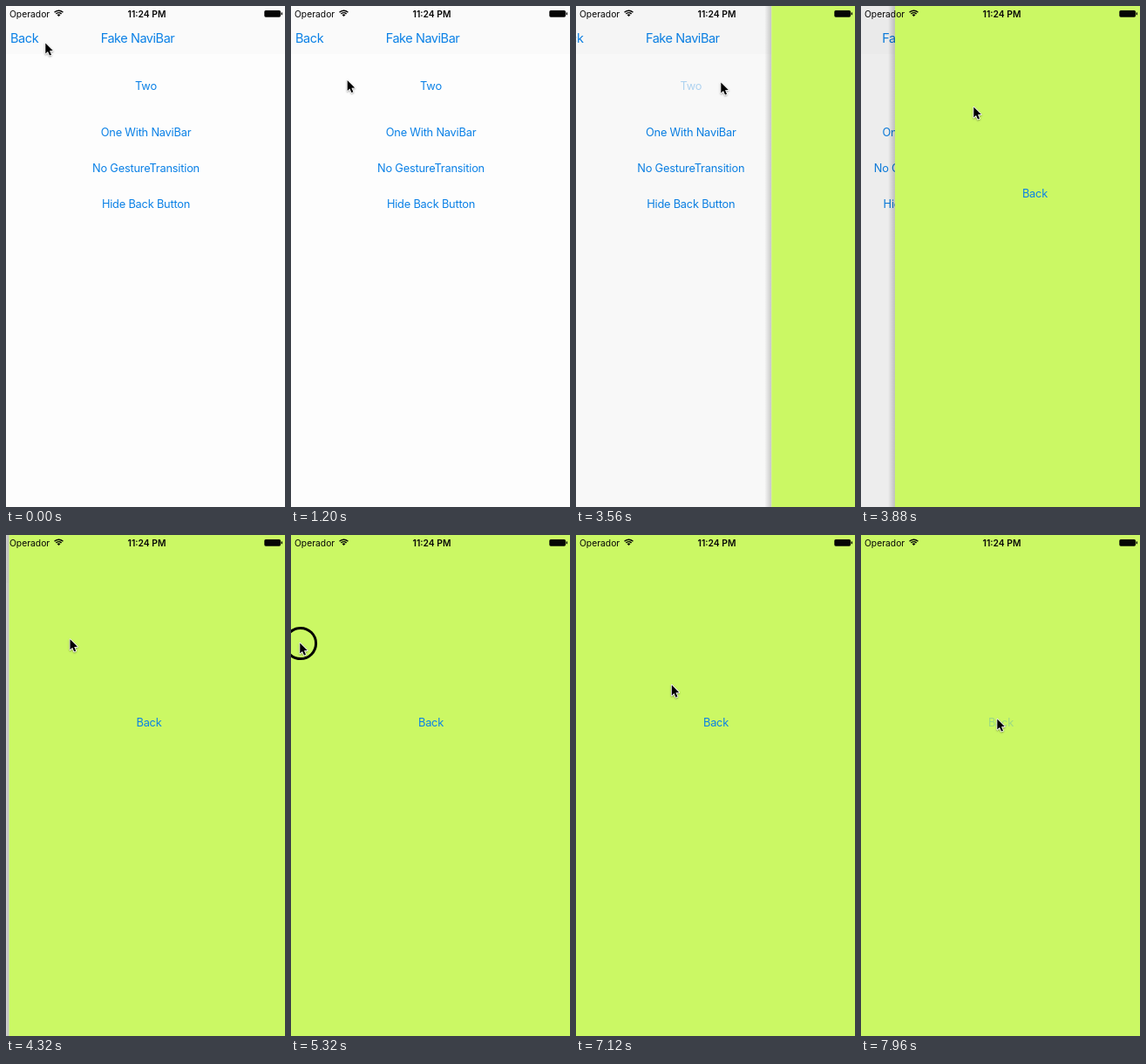
An HTML page with a canvas for the animation above (8000 ms loop, 320x573 px).

```html
<!DOCTYPE html>
<html lang="en">
<head>
<meta charset="utf-8">
<title>Navigation transition</title>
<style>
  html, body { margin: 0; width: 100%; height: 100%; overflow: hidden; background: #fdfdfd; }
  canvas { display: block; width: 320px; height: 573px; }
</style>
</head>
<body>
<canvas id="stage"></canvas>
<script>
const W = 320, H = 573, LOOP = 8000;
const BLUE = '#0a80e6', LIME = '#cbf864', INK = '#050505';
const FONT = 'Inter, Roboto, sans-serif';

const canvas = document.getElementById('stage');
const ctx = canvas.getContext('2d');
const dpr = window.devicePixelRatio || 1;
canvas.width = W * dpr;
canvas.height = H * dpr;

// Times in ms
const TAP_TWO = [3370, 3496];
const SWIPE = [5260, 6384];
const TAP_BACK = [7760, 7930];
const CANCEL_END = 6600;

// Pointer tip: [time, x, y]
const pointerPath = [
  [0, 45, 42], [500, 45, 42], [2000, 88, 136], [2560, 88, 136],
  [3200, 166, 87], [3620, 166, 87], [3880, 129, 115], [4800, 10, 123],
  [5400, 10, 123], [5880, 40, 123], [6300, 48, 122], [6600, 48, 122],
  [7560, 157, 209], [7640, 156, 210], [LOOP, 156, 210]
];

const clamp = v => Math.max(0, Math.min(1, v));
const mix = (a, b, u) => a + (b - a) * u;
const smooth = u => u * u * (3 - 2 * u);
const within = (t, [from, to]) => t >= from && t < to;

function pointerAt(t) {
  const i = pointerPath.findIndex(p => p[0] > t);
  const [t0, x0, y0] = pointerPath[i - 1];
  const [t1, x1, y1] = pointerPath[i];
  const u = smooth((t - t0) / (t1 - t0));
  return [mix(x0, x1, u), mix(y0, y1, u)];
}

// Left edge of the lime page
function edgeAt(t) {
  if (t < TAP_TWO[1]) return W;
  if (t < SWIPE[0]) {
    const x = W * Math.exp(-5.47 * (t - TAP_TWO[1]) / 1000);
    return x < 0.5 ? 0 : x;
  }
  if (t < SWIPE[1]) return Math.max(0, pointerAt(t)[0] - 10);
  return 38 * (1 - clamp((t - SWIPE[1]) / (CANCEL_END - SWIPE[1])));
}

// Button label opacity: drops on touch, fades back after release
function labelAlpha(t, [down, up]) {
  if (t < down) return 1;
  return t < up ? 0.2 : mix(0.2, 1, clamp((t - up) / 470));
}

function text(str, x, y, size, { align = 'center', weight = 400, color = BLUE, spacing = 0, alpha = 1 } = {}) {
  ctx.globalAlpha = alpha;
  ctx.font = `${weight} ${size}px ${FONT}`;
  ctx.letterSpacing = spacing + 'px';
  ctx.textAlign = align;
  ctx.fillStyle = color;
  ctx.fillText(str, x, y);
  ctx.globalAlpha = 1;
}

const button = (str, y, alpha = 1) => text(str, 160.5, y, 12.8, { spacing: -0.2, alpha });

function drawMenu(t, edge) {
  const shown = 1 - edge / W;
  ctx.fillStyle = '#fdfdfd';
  ctx.fillRect(0, 0, W, H);
  ctx.save();
  ctx.translate(-0.3 * W * shown, 0);
  ctx.fillStyle = '#fafafa';
  ctx.fillRect(0, 0, W, 55);
  text('Back', 5, 41.5, 14.5, { align: 'left', spacing: -0.4 });
  text('Fake NaviBar', 151, 41.5, 14.5, { spacing: -0.45 });
  button('Two', 95.5, labelAlpha(t, TAP_TWO));
  button('One With NaviBar', 149);
  button('No GestureTransition', 189.5);
  button('Hide Back Button', 231);
  ctx.restore();
  ctx.fillStyle = `rgba(0,0,0,${0.07 * shown})`;
  ctx.fillRect(0, 0, W, H);
}

function drawLime(t, edge) {
  if (edge > 0) {
    const shade = ctx.createLinearGradient(edge - 8, 0, edge, 0);
    shade.addColorStop(0, 'rgba(0,0,0,0)');
    shade.addColorStop(1, 'rgba(0,0,0,0.2)');
    ctx.fillStyle = shade;
    ctx.fillRect(edge - 8, 0, 8, H);
  }
  ctx.save();
  ctx.translate(edge, 0);
  ctx.fillStyle = LIME;
  ctx.fillRect(0, 0, W, H);
  button('Back', 218.7, labelAlpha(t, TAP_BACK));
  ctx.restore();
}

function drawStatus() {
  text('Operador', 4, 12.7, 10.3, { align: 'left', color: INK });
  text('11:24 PM', 161.5, 12.7, 10.3, { weight: 600, color: INK });

  const arc = r => {
    ctx.beginPath();
    ctx.arc(60.5, 12, r, -Math.PI * 0.76, -Math.PI * 0.24);
  };
  ctx.strokeStyle = ctx.fillStyle = INK;
  ctx.lineWidth = 1.4;
  for (const r of [4.3, 6.8]) { arc(r); ctx.stroke(); }
  arc(2.6);
  ctx.lineTo(60.5, 12);
  ctx.fill();

  ctx.beginPath();
  ctx.roundRect(296.3, 5, 18.7, 7.7, 1.6);
  ctx.roundRect(315.6, 7.3, 1.4, 3, 0.6);
  ctx.fill();
}

function drawPointer(t) {
  const [x, y] = pointerAt(t);
  if ([TAP_TWO, SWIPE, TAP_BACK].some(span => within(t, span))) {
    ctx.beginPath();
    ctx.arc(x + 1, y + 1, 17.6, 0, Math.PI * 2);
    ctx.strokeStyle = '#000';
    ctx.lineWidth = 3;
    ctx.stroke();
  }
  ctx.save();
  ctx.translate(x, y);
  ctx.beginPath();
  [[0.3, 0.5], [0.3, 12.6], [3, 10], [5, 14.6], [7, 13.8], [5, 9.3], [8.8, 9.1]]
    .forEach(p => ctx.lineTo(...p));
  ctx.closePath();
  ctx.lineJoin = 'round';
  ctx.shadowColor = 'rgba(0,0,0,0.35)';
  ctx.shadowBlur = 2 * dpr;
  ctx.shadowOffsetY = dpr;
  ctx.strokeStyle = '#fff';
  ctx.lineWidth = 1.6;
  ctx.stroke();
  ctx.shadowColor = 'transparent';
  ctx.fillStyle = '#000';
  ctx.fill();
  ctx.restore();
}

function draw(t) {
  const edge = edgeAt(t);
  ctx.setTransform(dpr, 0, 0, dpr, 0, 0);
  if (edge > 0) drawMenu(t, edge);
  if (edge < W) drawLime(t, edge);
  drawStatus();
  drawPointer(t);
}

const start = performance.now();
function tick() {
  draw((performance.now() - start) % LOOP);
  requestAnimationFrame(tick);
}
tick();
</script>
</body>
</html>
```
